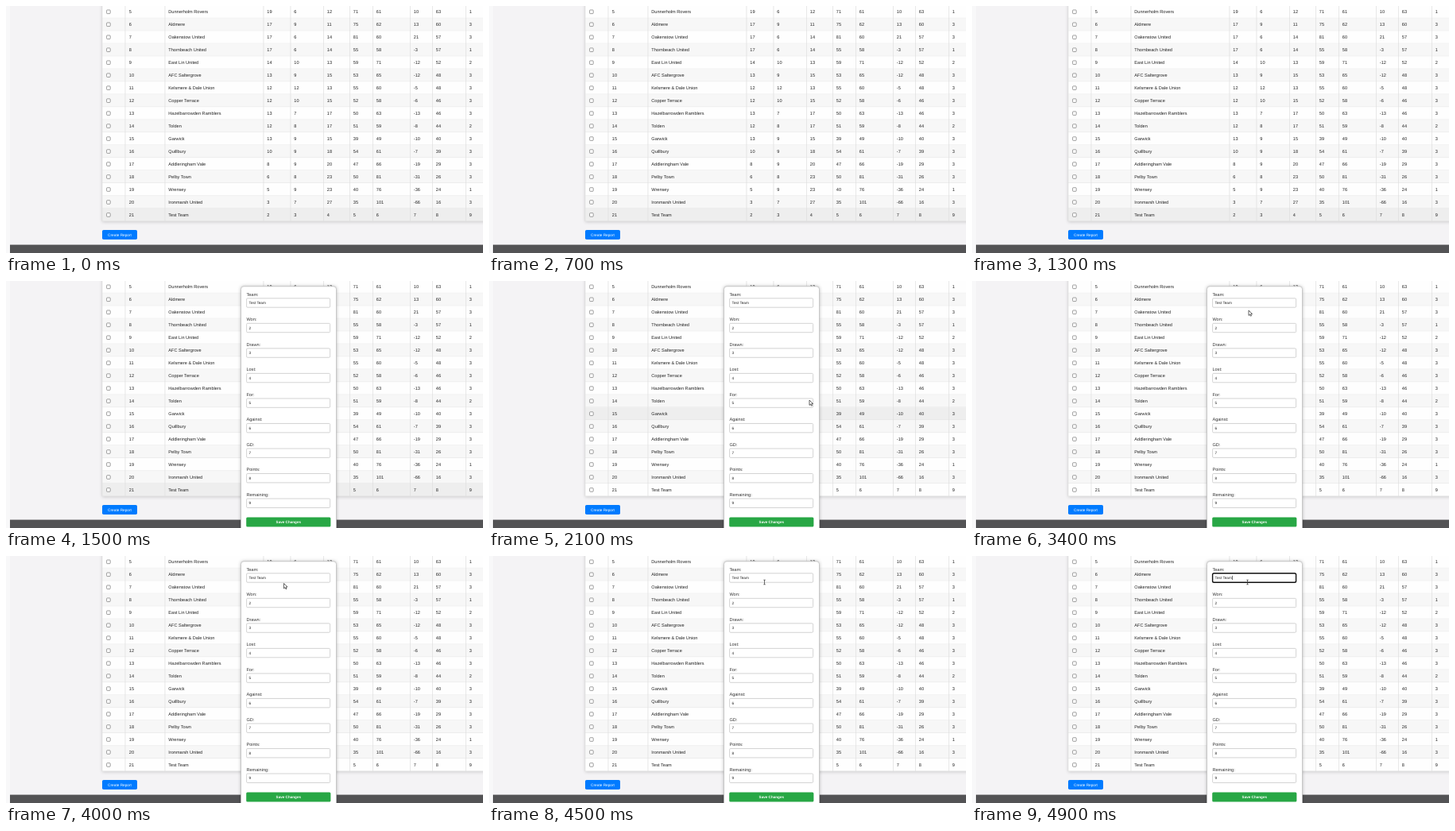
These frames come from a looping animation (600x311 px, 5000 ms). An HTML page with a canvas:

```html
<!DOCTYPE html>
<html lang="en">
<head>
<meta charset="utf-8">
<title>League table editor</title>
<style>
html, body { margin: 0; width: 100%; height: 100%; overflow: hidden; background: #f4f3f5; }
canvas { display: block; width: 600px; height: 311px; }
</style>
</head>
<body>
<canvas id="stage" width="600" height="311"></canvas>
<script>
const ctx = document.getElementById('stage').getContext('2d');
const LOOP = 5000, STEP = 100;
const FONT = '"Liberation Sans", Arial, sans-serif';
const ROW_H = 15.98, TABLE_TOP = -0.6, TABLE_LEFT = 121;
const MODAL_AT = 1400, FOCUS_AT = 4700;

// team | won drawn lost for against remaining [points deducted]
const teams = [
  'Dunnerholm Rovers|19 6 12 71 61 1',
  'Aldmere|17 9 11 75 62 3',
  'Oakenstow United|17 6 14 81 60 3',
  'Thornbeach United|17 6 14 55 58 1',
  'East Lin United|14 10 13 59 71 2',
  'AFC Saltergrove|13 9 15 53 65 3',
  'Kelsmere & Dale Union|12 12 13 55 60 3',
  'Copper Terrace|12 10 15 52 58 3',
  'Hazelbarrowden Ramblers|13 7 17 50 63 3',
  'Tolden|12 8 17 51 59 2',
  'Garwick|13 9 15 39 49 3 8',
  'Quillbury|10 9 18 54 61 3',
  'Addleringham Vale|8 9 20 47 66 3 4',
  'Pelby Town|6 8 23 50 81 3',
  'Wrensey|5 9 23 40 76 1',
  'Ironmarsh United|3 7 27 35 101 3'
].map((line, i) => {
  const [name, stats] = line.split('|');
  const [won, drawn, lost, scored, against, left, cut = 0] = stats.split(' ').map(Number);
  return [i + 5, name, won, drawn, lost, scored, against,
    scored - against, won * 3 + drawn - cut, left];
});
teams.push([21, 'Test Team', 2, 3, 4, 5, 6, 7, 8, 9]);

const columns = [150, 200, 324, 358, 399.5, 432.5, 461.5, 508.5, 536.5, 578.5];
const fields = ['Team', 'Won', 'Drawn', 'Lost', 'For', 'Against', 'GD', 'Points', 'Remaining'];

// time, x, y of the pointer
const path = [
  [1500, 622, 263], [2000, 425, 166], [2100, 403, 150], [2400, 380, 108],
  [2600, 351, 54], [2700, 345, 39], [3400, 348, 37], [4000, 349.5, 34.5], [4500, 346.5, 33]
];

function pointerAt(t) {
  if (t <= path[0][0]) return path[0].slice(1);
  for (let i = 1; i < path.length; i++) {
    const [t0, x0, y0] = path[i - 1], [t1, x1, y1] = path[i];
    if (t <= t1) {
      const k = (t - t0) / (t1 - t0);
      return [x0 + (x1 - x0) * k, y0 + (y1 - y0) * k];
    }
  }
  return path[path.length - 1].slice(1);
}

function rect(x, y, w, h, fill) {
  ctx.fillStyle = fill;
  ctx.fillRect(x, y, w, h);
}

function box(x, y, w, h, r, fill, stroke, line = 1) {
  ctx.beginPath();
  ctx.roundRect(x, y, w, h, r);
  if (fill) { ctx.fillStyle = fill; ctx.fill(); }
  if (stroke) { ctx.strokeStyle = stroke; ctx.lineWidth = line; ctx.stroke(); }
}

// y is the middle of the capitals
function text(s, x, y, size, color, align = 'left', weight = 'normal') {
  ctx.font = `${weight} ${size}px ${FONT}`;
  ctx.textAlign = align;
  ctx.fillStyle = color;
  ctx.fillText(s, x, y + size * 0.36);
}

function shape(points, fill, stroke) {
  ctx.beginPath();
  points.forEach(([x, y]) => ctx.lineTo(x, y));
  ctx.closePath();
  ctx.fillStyle = fill;
  ctx.fill();
  if (stroke) { ctx.strokeStyle = stroke; ctx.lineWidth = 0.7; ctx.stroke(); }
}

function drawTable(hovered) {
  const bottom = TABLE_TOP + ROW_H * teams.length;
  ctx.save();
  ctx.shadowColor = 'rgba(0,0,0,0.18)';
  ctx.shadowBlur = 4;
  ctx.shadowOffsetY = 1;
  rect(TABLE_LEFT, -10, 490, bottom + 10, '#fff');
  ctx.restore();
  teams.forEach((row, i) => {
    const y = TABLE_TOP + i * ROW_H, mid = y + 8;
    rect(TABLE_LEFT, y, 479, ROW_H, i === hovered ? '#eeeeee' : i % 2 ? '#f7f7f7' : '#fefefe');
    rect(TABLE_LEFT, y + ROW_H - 0.5, 479, 0.6, '#dedede');
    box(126.6, mid - 2.4, 4.6, 4.6, 0.8, '#fff', '#777', 0.7);
    row.forEach((value, c) => text(value, columns[c] + (c ? 4.3 : 4.8), mid, 5.6, '#222'));
  });
  [TABLE_LEFT, ...columns].forEach(x => rect(x - 0.4, 0, 0.7, bottom, '#dedede'));
}

function drawModal(focused, spinner) {
  ctx.save();
  ctx.shadowColor = 'rgba(0,0,0,0.3)';
  ctx.shadowBlur = 4;
  box(295.5, 6.8, 120, 330, 3.5, '#fff');
  ctx.restore();
  box(295.5, 6.8, 120, 330, 3.5, null, '#b8b8b8', 0.7);
  fields.forEach((name, i) => {
    const y = 27.4 + i * 31.53;
    text(name + ':', 302.4, y - 10.7, 5.6, '#333');
    const active = focused && i === 0;
    box(302.6, y - 5.6, 105, 11.4, active ? 1.8 : 1.2, '#fff',
      active ? '#111' : '#c8c8c8', active ? 1.4 : 0.8);
    text(i ? i + 1 : 'Test Team', 305.6, y + 0.1, 4.7, '#222');
  });
  if (focused) rect(327, 24.8, 0.6, 5.4, '#111');
  if (spinner) {
    shape([[400.2, 58.3], [403, 58.3], [401.6, 56.6]], '#444');
    shape([[400.2, 59.8], [403, 59.8], [401.6, 61.5]], '#444');
  }
  box(302.2, 297.6, 106.2, 12, 1.5, '#28a745');
  text('Save Changes', 355.3, 303.5, 4.6, '#fff', 'center', 'bold');
}

function drawArrow(x, y) {
  const outline = [[0, 0], [0, 6.4], [1.5, 5.1], [2.5, 7.2], [3.5, 6.7], [2.6, 4.7], [4.5, 4.5]];
  shape(outline.map(([dx, dy]) => [x + dx, y + dy]), '#fff', '#222');
}

function drawBeam(x, y) {
  rect(x - 0.3, y - 3, 0.7, 6, '#333');
  rect(x - 1.3, y - 3.2, 2.7, 0.6, '#333');
  rect(x - 1.3, y + 2.6, 2.7, 0.6, '#333');
}

function draw(t) {
  const [x, y] = pointerAt(t);
  // the last table row crossed stays lit briefly beneath the dialog
  const hovered = t <= 2100 ? Math.floor((Math.max(y, 166) - TABLE_TOP) / ROW_H) : -1;
  rect(0, 0, 600, 311, '#f4f3f5');
  rect(0, 0, 5, 311, '#f8f8f9');
  drawTable(hovered);
  box(121, 282, 44, 12, 1.8, '#007bff');
  text('Create Report', 143, 288, 4.75, '#fff', 'center');
  rect(5, 300.6, 595, 11, '#535355');
  if (t >= MODAL_AT) drawModal(t >= FOCUS_AT, t >= 2600 && t <= 2700);
  if (t >= 4400) drawBeam(x, y);
  else if (t > 1500) drawArrow(x, y);
}

ctx.textBaseline = 'alphabetic';
ctx.textRendering = 'geometricPrecision';
const start = performance.now();
function tick() {
  const t = (performance.now() - start) % LOOP;
  draw(Math.floor(t / STEP) * STEP);
  requestAnimationFrame(tick);
}
tick();
</script>
</body>
</html>
```
